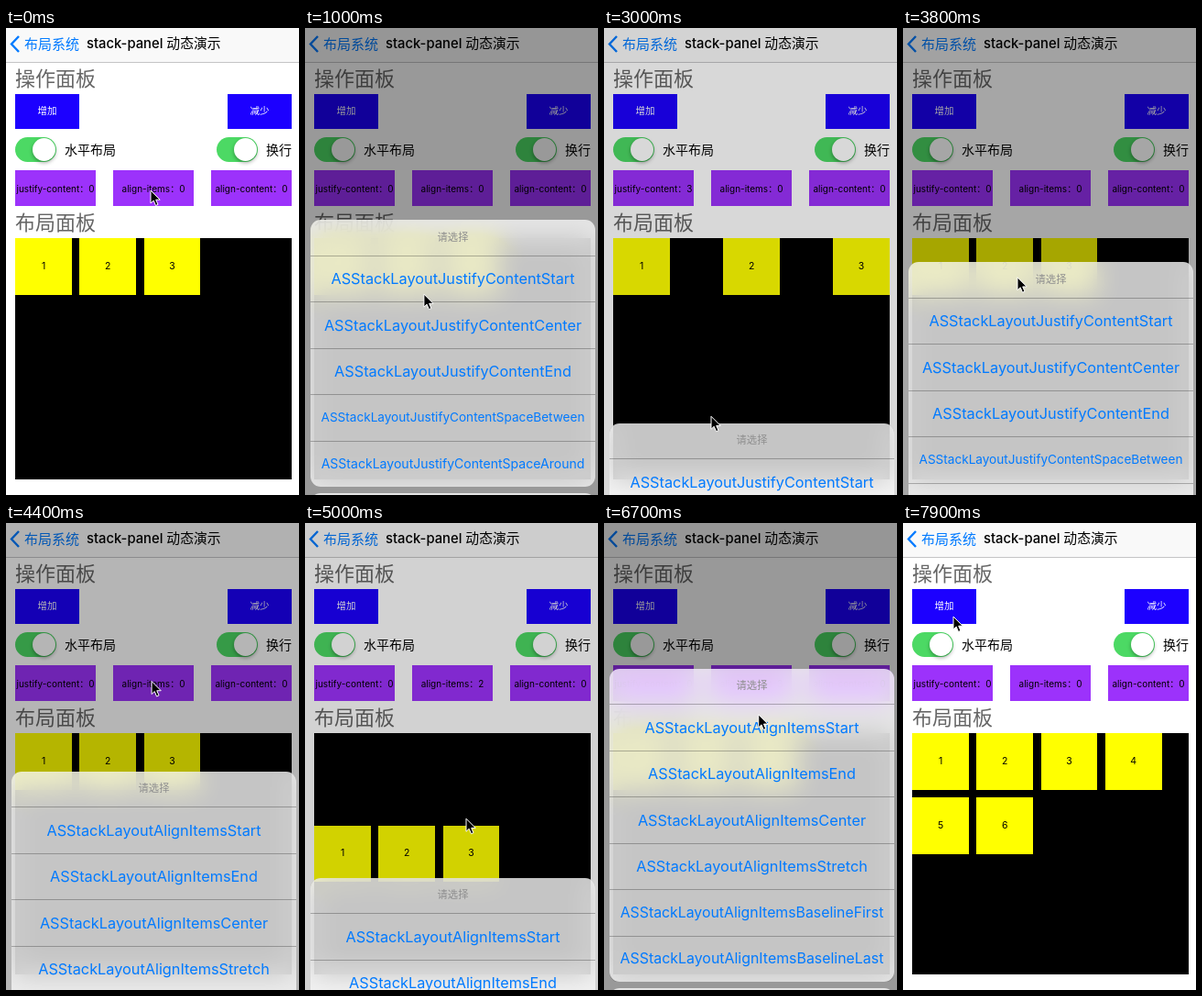
Write an HTML page that moves like this. It is 320 px wide and 509 px high and loops after 8000 ms.

```html
<!DOCTYPE html>
<html lang="zh-CN">
<head>
<meta charset="utf-8">
<title>stack-panel 动态演示</title>
<style>
html, body { margin: 0; width: 100%; height: 100%; overflow: hidden; background: #fff; }
body { font: 14px/1 Inter, "Noto Sans CJK SC", "Noto Sans CJK", sans-serif; }
#stage { position: absolute; left: 0; top: 0; width: 320px; height: 509px; overflow: hidden; }
#stage div { position: absolute; box-sizing: border-box; white-space: nowrap; }
.mid, .left { display: flex; align-items: center; }
.mid { justify-content: center; }
.nav { background: #f9f9f9; border-bottom: 1px solid #c4c4c6; }
.back { color: #007aff; font-size: 15px; }
.title { font-size: 14.8px; font-weight: 500; }
.blue { background: #1c00ff; color: #fff; font-size: 10.5px; }
.purple { background: #9c32fb; font-size: 10px; }
.head { color: #666; font-size: 22px; }
.switch { background: #4cd964; border-radius: 14px; }
.switch::after { content: ""; position: absolute; right: 1px; top: 1px; width: 25px; height: 25px;
  border-radius: 50%; background: #fff; box-shadow: 0 2px 4px #0005; }
.panel, .dim { background: #000; }
.card { background: #ff0; font-size: 10.5px; }
.sheet { background: rgba(250, 250, 250, .79); backdrop-filter: blur(14px) saturate(2.5);
  border-radius: 11px; overflow: hidden; }
.note { color: #8f8f8f; font-size: 11.3px; }
.row { color: #007aff; border-top: 1px solid #0004; }
svg { position: absolute; left: 0; top: 0; }
</style>
</head>
<body>
<div id="stage"></div>
<script>
const stage = document.getElementById('stage');

function box(x, y, w, h, cls, text = '', parent = stage) {
  const el = document.createElement('div');
  el.className = cls;
  el.textContent = text;
  el.style.cssText = `left:${x}px;top:${y}px;width:${w}px;height:${h}px`;
  return parent.appendChild(el);
}

function svg(w, h, d, attrs) {
  stage.insertAdjacentHTML('beforeend',
    `<svg width="${w}" height="${h}"><path d="${d}" ${attrs}/></svg>`);
  return stage.lastElementChild;
}

// Static page
box(0, 0, 320, 38, 'nav');
svg(20, 36, 'M14 9L6 17.5L14 26', 'fill="none" stroke="#007aff" stroke-width="2.4"');
box(20, 7, 62, 21, 'left back', '布局系统');
box(88, 7, 160, 21, 'left title', 'stack-panel 动态演示');
['操作面板', '布局面板'].forEach((s, i) => box(10, 41 + 157 * i, 120, 27, 'left head', s));
['增加', '减少'].forEach((s, i) => box(10 + 232 * i, 72, 70, 38, 'mid blue', s));
['水平布局', '换行'].forEach((s, i) => {
  box(10 + 220 * i, 119, 45, 27, 'switch');
  box(64 + 220 * i, 119, 80, 27, 'left', s);
});
const labels = [0, 1, 2].map(i => box(10 + 107 * i, 155, 88, 39, 'mid purple'));

const PANEL_W = 301.8, PANEL_H = 263, CARD = 61.8, PITCH = 70.2, PER_ROW = 4;
const panel = box(10.2, 229, PANEL_W, PANEL_H, 'panel');
const cards = [1, 2, 3, 4, 5, 6].map(n => box(0, 0, CARD, CARD, 'mid card', n, panel));
const dim = box(0, 0, 320, 509, 'dim');

// Action sheets
const ROW = 50.5, HEAD = 38.5, BOTTOM = 500, SCREEN = 569;
const pen = document.createElement('canvas').getContext('2d');
pen.font = '16px Inter, sans-serif';

function makeSheet(prefix, options, buttonX) {
  const h = HEAD + ROW * options.length, top = BOTTOM - h;
  const el = box(6, 0, 311, h, 'sheet');
  box(0, 0, 311, HEAD, 'mid note', '请选择', el);
  options.forEach((name, i) => {
    const text = 'ASStackLayout' + prefix + name;
    const row = box(0, HEAD + ROW * i, 311, ROW, 'mid row', text, el);
    row.style.fontSize = Math.min(16.3, 16 * 288 / pen.measureText(text).width) + 'px';
  });
  return { el, top, buttonX, optionY: i => top + HEAD + ROW * (i + 0.5) - 1 };
}
const justify = makeSheet('JustifyContent',
  ['Start', 'Center', 'End', 'SpaceBetween', 'SpaceAround'], 56);
const align = makeSheet('AlignItems',
  ['Start', 'End', 'Center', 'Stretch', 'BaselineFirst', 'BaselineLast'], 159);
const cancel = box(6, 0, 311, ROW, 'sheet');
const cursor = svg(14, 20, 'M1 1V15L4.2 12L6.5 17.5L9 16.4L6.7 11.2H11.2Z',
  'fill="#000" stroke="#fff" stroke-width="1"');

// Each choice: sheet, time opened, time picked, option, cursor x at the pick
const choices = [
  [justify, 450, 1200, 1, 150], [justify, 1450, 1800, 2, 106],
  [justify, 2350, 2886, 3, 117], [justify, 3330, 3780, 0, 125],
  [align, 4233, 4900, 2, 176], [align, 5200, 5841, 3, 183], [align, 6200, 6900, 0, 172]
];

// The cursor rests at every button and option it clicks
const stops = [
  [0, 158, 177],
  ...choices.flatMap(([sheet, open, pick, option, x]) => {
    const y = sheet.optionY(option);
    return [[open, sheet.buttonX, 172], [open + 150, sheet.buttonX, 172],
            [pick - 30, x, y], [pick + 120, x, y]];
  }),
  [7350, 55, 102], [8000, 55, 102]
];

const clamp = (v, lo = 0, hi = 1) => Math.max(lo, Math.min(hi, v));
const easeOut = v => 1 - (1 - clamp(v)) ** 2;
const smooth = v => v * v * (3 - 2 * v);

function moveCursor(t) {
  const i = stops.findIndex(s => s[0] > t);
  const [t0, x0, y0] = stops[i - 1], [t1, x1, y1] = stops[i];
  const k = smooth((t - t0) / (t1 - t0));
  cursor.style.transform = `translate(${x0 + (x1 - x0) * k - 1}px,${y0 + (y1 - y0) * k - 1}px)`;
}

function layout(count, along, across) {
  const inRow = Math.min(count, PER_ROW);
  const free = PANEL_W - CARD - PITCH * (inRow - 1);
  const left = [0, free / 2, free, 0][along];
  const pitch = PITCH + (along === 3 ? free / (inRow - 1) : 0);
  const top = [0, 1, 0.5, 0][across] * (PANEL_H - CARD);
  cards.forEach((card, i) => {
    card.style.visibility = i < count ? 'visible' : 'hidden';
    card.style.left = left + i % PER_ROW * pitch + 'px';
    card.style.top = top + Math.floor(i / PER_ROW) * PITCH + 'px';
  });
}

function draw(t) {
  const value = new Map([[justify, 0], [align, 0]]);
  let shown = 0, active = null;
  for (const [sheet, open, pick, option] of choices) {
    if (t >= pick) value.set(sheet, option);
    const p = easeOut((t - open) / 350) * (1 - easeOut((t - pick) / 300));
    if (p > 0) [shown, active] = [p, sheet];
  }
  for (const s of [justify, align]) s.el.style.display = s === active ? '' : 'none';
  cancel.style.display = active ? '' : 'none';
  dim.style.opacity = 0.4 * shown;
  if (active) {
    const shift = (SCREEN - active.top) * (1 - shown);
    active.el.style.top = active.top + shift + 'px';
    cancel.style.top = 507 + shift + 'px';
  }
  const along = value.get(justify), across = value.get(align);
  labels[0].textContent = 'justify-content：' + along;
  labels[1].textContent = 'align-items：' + across;
  labels[2].textContent = 'align-content：0';
  layout(3 + clamp(Math.floor((t - 7250) / 200), 0, 3), along, across);
  moveCursor(t);
}

const startTime = performance.now();
function tick() {
  draw(Math.floor((performance.now() - startTime) % 8000 / 100) * 100);
  requestAnimationFrame(tick);
}
tick();
</script>
</body>
</html>
```
